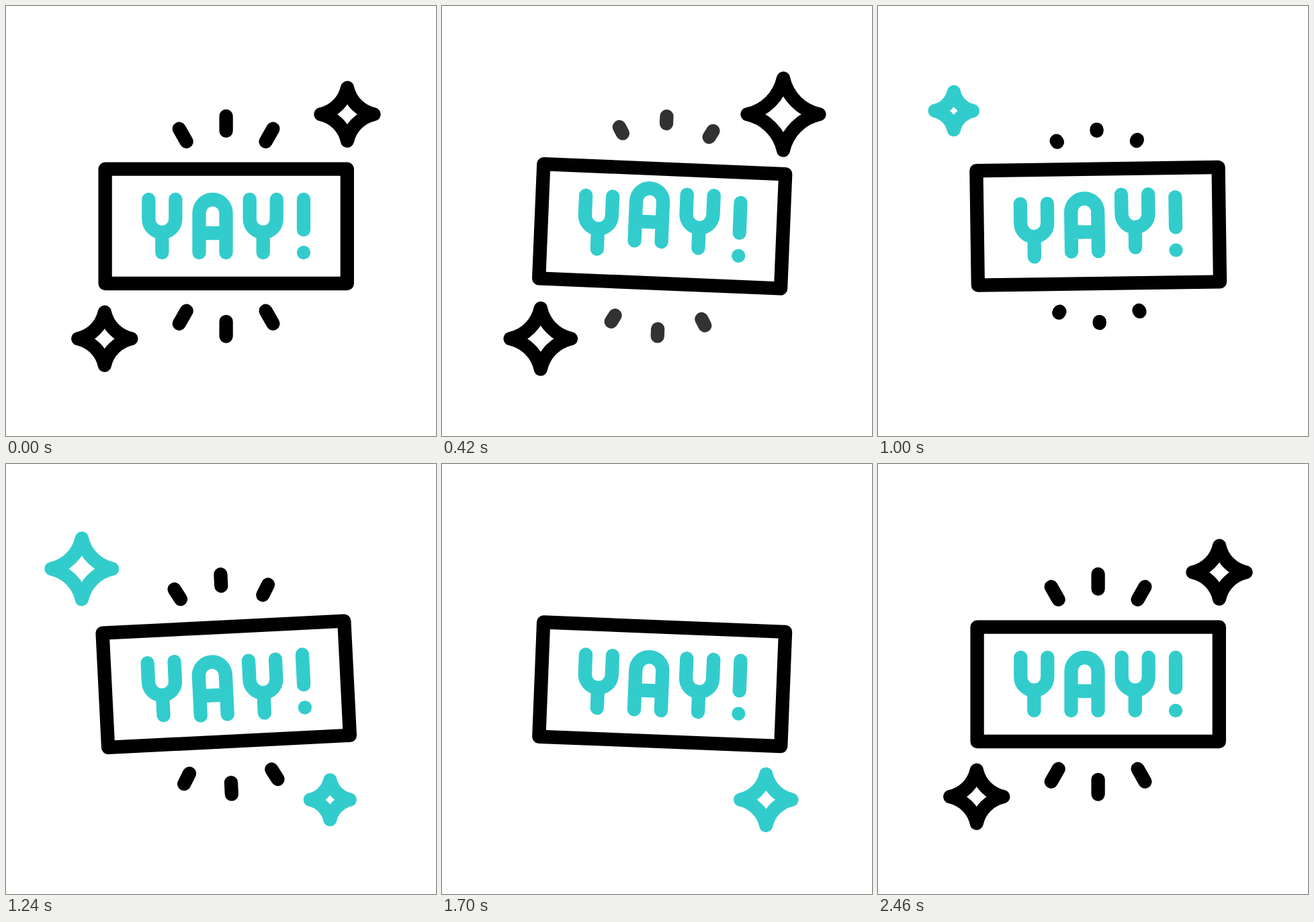
An HTML page that plays this animation: 640x640 px, repeating every 2.5 s.

```html
<!DOCTYPE html>
<html lang="en">
<head>
<meta charset="utf-8">
<title>Yay!</title>
<style>
  html, body { margin: 0; width: 100%; height: 100%; overflow: hidden; background: #fff; }
  svg { display: block; width: 100vw; height: 100vh; }
  svg * { fill: none; stroke-width: 20.3; stroke-linecap: round; stroke-linejoin: round; }
  .ink { stroke: #000; }
  .teal { stroke: #3cc; }
</style>
</head>
<body>
<svg viewBox="0 0 640 640" role="img" aria-label="YAY!">
  <g id="sign">
    <rect class="ink" x="147.6" y="242.6" width="360.2" height="170.4"/>
    <g id="rays"></g>
    <g id="letters"></g>
  </g>
  <g id="stars"></g>
</svg>
<script>
const LOOP = 2500;
const CX = 327.6, CY = 327.8;
const $ = id => document.getElementById(id);

function add(parent, cls, d = '') {
  const el = document.createElementNS('http://www.w3.org/2000/svg', 'path');
  el.setAttribute('class', cls);
  el.setAttribute('d', d);
  parent.append(el);
  return el;
}

// 0 to 1 over the given span, held outside it.
const ramp = (t, start, span) => Math.min(1, Math.max(0, (t - start) / span));
const smooth = p => (1 - Math.cos(Math.PI * p)) / 2;
const easeOut = p => 1 - (1 - p) ** 3;

// Smooth passage through the poses pose(0), pose(1), ...
function through(pose, k) {
  const i = Math.floor(k);
  return pose(i) + (pose(i + 1) - pose(i)) * smooth(k - i);
}

// Ten alternating swings between two level poses.
const swing = i => i < 1 || i > 10 ? 0 : 3 * (-1) ** i;
const wobble = t => through(swing, (t - 133) / 160.4);

// Each swing of a letter takes a little longer: pose k falls at 180k + 14k².
const HOPS = [0, -16, 13.5, -7, 6.5];
const hop = i => HOPS[i] || 0;
const bounce = t => through(hop, (Math.sqrt(180 ** 2 + 56 * Math.max(0, t)) - 180) / 28);

const shapeY = 'M-20 288V317a20 20 0 0 0 40 0V288M0 337V367';
const shapeA = 'M-20 367V308a20 20 0 0 1 40 0V367M-20 338H20';
const shapeBang = 'M0 288V333M0 367V367';
const letters = [shapeY, shapeA, shapeY, shapeBang].map((d, i) => ({
  x: i < 3 ? 232.3 + 75.2 * i : 443,
  el: add($('letters'), 'teal', d)
}));

// Rays: inner and outer ends, mirrored about the sign's centre.
const rays = [];
for (const sy of [-1, 1])
  for (const sx of [-1, 0, 1])
    rays.push({
      inner: [59 * sx, (sx ? 126 : 142) * sy],
      outer: [69.8 * sx, (sx ? 145 : 163.8) * sy],
      el: add($('rays'), 'ink')
    });

function drawRays(t) {
  const [enter, leave] = t < 1800 ? [976, 1173] : [1840, LOOP + 255];
  const head = ramp(t, enter, 240), tail = ramp(t, leave, 330);
  const alpha = ramp(t, enter - 40, 40) - ramp(t, leave + 103, 312);
  $('rays').setAttribute('opacity', alpha);
  for (const { inner, outer, el } of rays) {
    const point = p => [
      CX + inner[0] + (outer[0] - inner[0]) * p,
      CY + inner[1] + (outer[1] - inner[1]) * p
    ].join(' ');
    el.setAttribute('d', `M${point(tail)}L${point(Math.max(head, tail))}`);
  }
}

// Stars fade in small, grow to rest, swell to a peak, then shrink and fade.
const SMALL = 28, REST = 39.5, BIG = 54.7;
const star = (x, y, cls, born, peak, rise, rest) => {
  const el = add($('stars'), cls);
  el.setAttribute('transform', `translate(${x} ${y})`);
  return { el, born, peak, rise, rest };
};
const inkStar = (x, y, born, peak) => star(x, y, 'ink', born, LOOP + peak, 110, REST);
const tealStar = (x, y, born) => star(x, y, 'teal', born, born + 413, 373, SMALL);
const stars = [
  inkStar(508, 161.2, 1920, 430),
  inkStar(146.8, 495.2, 2120, 490),
  tealStar(112.8, 156, 960),
  tealStar(482.3, 499.7, 1182)
];

// Four circular arcs between the tips.
function starPath(r) {
  const arc = `A${1.31 * r} ${1.31 * r} 0 0 0 `;
  return `M0 ${-r}${arc}${r} 0${arc}0 ${r}${arc}${-r} 0${arc}0 ${-r}Z`;
}

function drawStar({ el, born, peak, rise, rest }, t) {
  const r = SMALL
    + (rest - SMALL) * easeOut(ramp(t, born + 40, 300))
    + (BIG - rest) * ramp(t, peak - rise, rise)
    - (BIG - SMALL) * ramp(t, peak, 170);
  el.setAttribute('d', starPath(r));
  el.setAttribute('opacity', ramp(t, born, 40) - ramp(t, peak + 150, 60));
}

function draw(t) {
  $('sign').setAttribute('transform', `rotate(${wobble(t)} ${CX} ${CY})`);
  letters.forEach(({ x, el }, i) =>
    el.setAttribute('transform', `translate(${x} ${bounce(t - 120 - 100 * i)})`));

  // Rays and black stars live across the loop's seam.
  const late = t < 900 ? t + LOOP : t;
  drawRays(late);
  for (const s of stars) drawStar(s, late);
}

const start = performance.now();
function tick() {
  draw((performance.now() - start) % LOOP);
  requestAnimationFrame(tick);
}
tick();
</script>
</body>
</html>
```
